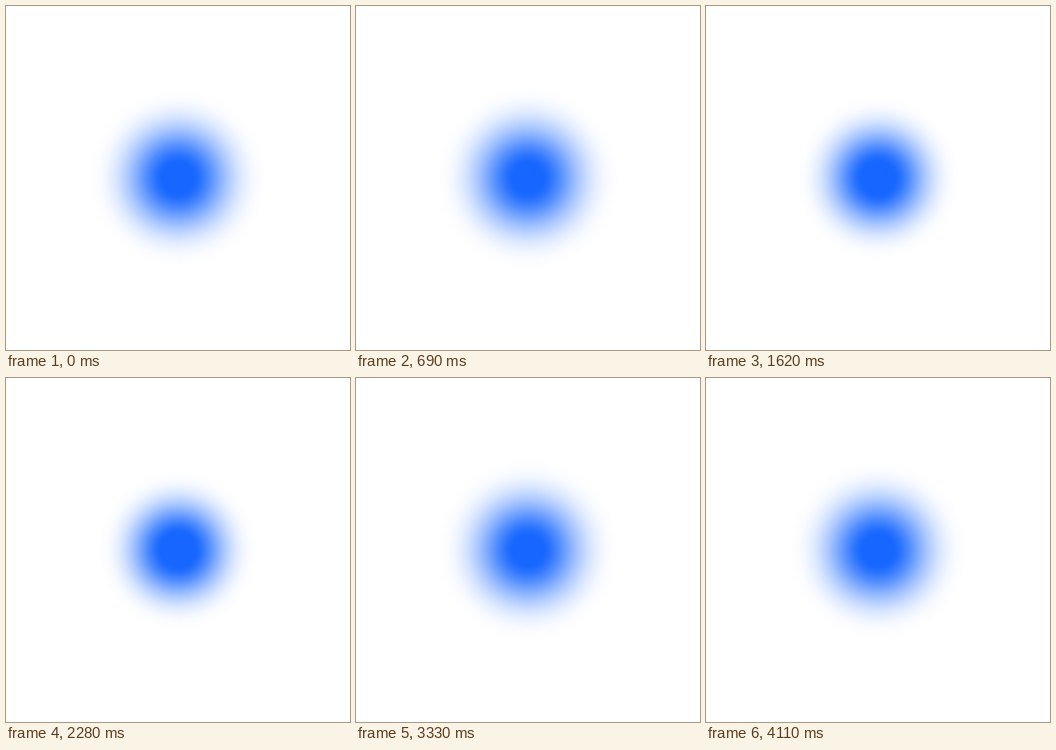
An HTML page with a canvas for the animation above (4.14 s loop, 600 px wide and 600 px high).

```html
<!DOCTYPE html>
<html lang="en">
<head>
<meta charset="utf-8">
<title>Pulsing glow</title>
<style>
  html, body { margin: 0; width: 100%; height: 100%; overflow: hidden; background: #fff; }
  canvas { display: block; width: 600px; height: 600px; }
</style>
</head>
<body>
<canvas id="stage" width="600" height="600"></canvas>
<script>
const ctx = document.getElementById("stage").getContext("2d");
const SIZE = 600, MID = SIZE / 2, LOOP = 4140, STEP = 30, STOPS = 40;
const BLUE = "22,102,255";

// Turning points of the pulse: time in ms, reach of the glow in px
const pulse = [
  { at: 0, reach: 161 },
  { at: 360, reach: 168.5 },
  { at: 2130, reach: 142 },
  { at: 3510, reach: 165.5 },
  { at: LOOP, reach: 161 }
];

const ease = u => (1 - Math.cos(Math.PI * u)) / 2;
const falloff = u => (1 - u ** 1.5) ** 3;

function reachAt(t) {
  const i = pulse.findIndex(p => p.at > t);
  const a = pulse[i - 1], b = pulse[i];
  return a.reach + (b.reach - a.reach) * ease((t - a.at) / (b.at - a.at));
}

// The solid core shrinks a little as the soft edge spreads
function draw(t) {
  const reach = reachAt(t);
  const core = 58 - reach * 0.2;
  const glow = ctx.createRadialGradient(MID, MID, core, MID, MID, reach + 5);
  for (let i = 0; i <= STOPS; i++) {
    const u = i / STOPS;
    glow.addColorStop(u, `rgba(${BLUE},${falloff(u).toFixed(4)})`);
  }
  ctx.fillStyle = "#fff";
  ctx.fillRect(0, 0, SIZE, SIZE);
  ctx.fillStyle = glow;
  ctx.fillRect(0, 0, SIZE, SIZE);
}

const start = performance.now();
function tick() {
  const t = Math.max(0, performance.now() - start) % LOOP;
  draw(Math.floor(t / STEP) * STEP);
  requestAnimationFrame(tick);
}
tick();
</script>
</body>
</html>
```
